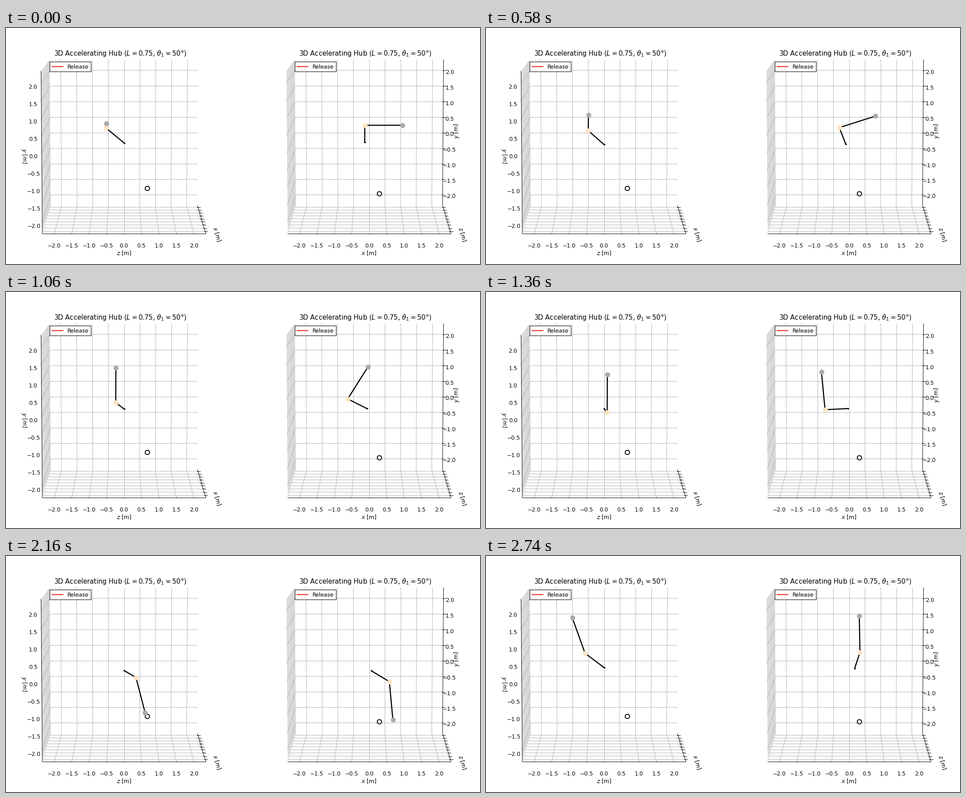
Animation, 1058 px wide and 529 px high, one loop 2760 ms. Source, as a matplotlib script:

```python
import numpy as np
import matplotlib.pyplot as plt
from matplotlib.animation import FuncAnimation
from matplotlib.collections import LineCollection
from matplotlib.patches import Rectangle

W, H = 1058, 529
STEP = 20          # ms per frame
FRAMES = 138
SHIFT = 547.2      # distance between the two panels
LIM = 2.344        # half size of the box in metres
TICKS = np.arange(-2, 2.01, 0.5)
TILT = np.radians(40)
ARM = 1.155        # outer arm length

plt.rcParams["font.family"] = "DejaVu Sans"
fig = plt.figure(figsize=(12, 6), dpi=W / 12, facecolor="white")
ax = fig.add_axes([0, 0, 1, 1])
ax.set_xlim(0, W)
ax.set_ylim(H, 0)
ax.axis("off")


def project(h, y, d, dx=0.0):
    """Perspective view: h to the right, y up, d away from the viewer."""
    w = 1.05025 - 0.0032 * y + 0.02464 * d
    return (263.6 + dx + 77.86 * h / w,
            (269.3 - 3.712 * d - 78.08 * y) / w)


# ---------- static scene ----------

def lines(paths, dx, color):
    pts = [[project(*p, dx) for p in path] for path in paths]
    ax.add_collection(LineCollection(pts, colors=color, linewidths=0.8,
                                     zorder=1 if color != "black" else 2))


def label(x, y, s, size=10, **kw):
    kw = {"ha": "center", "va": "center_baseline", **kw}
    ax.text(x, y, s, fontsize=size, color="black", zorder=3, **kw)


def num(v):
    return f"{v:.1f}".replace("-", "\u2212")


def panel(dx, h_name, d_name, y_right):
    m = LIM
    grid = []
    for t in TICKS:
        grid.append([(t, -m, -m), (t, -m, m), (t, m, m)])
        grid.append([(-m, t, -m), (-m, t, m), (m, t, m)])
        grid.append([(m, -m, t), (-m, -m, t), (-m, m, t)])
    lines(grid, dx, "#b0b0b0")

    a, b = 0.0375, 0.075
    axes = [[(-m, -m, -m), (m, -m, -m)], [(m, -m, -m), (m, -m, m)]]
    for t in TICKS:
        axes.append([(t, -m, -m - a), (t, -m, -m + b)])
        axes.append([(m - a, -m, t), (m + b, -m, t)])
        if y_right:
            axes.append([(m - a, t, m), (m + b, t, m)])
        else:
            axes.append([(-m, t, -m - a), (-m, t, -m + b)])
    if y_right:
        axes.append([(m, -m, m), (m, m, m)])
    else:
        axes.append([(-m, -m, -m), (-m, m, -m)])
    lines(axes, dx, "black")

    for i, t in enumerate(TICKS):
        label(263.3 + dx + 78.1 * t, 486.5, num(t))
        if y_right:
            label(989 + 0.25 * i, 376.3 - 34.75 * i, num(t))
        else:
            label(62.5 - 0.28 * i, 443.3 - 39.05 * i, num(t))

    label(263.2 + dx, 504.5, f"${h_name}$ [m]", va="center")
    label(471.3 + dx, 462.5, f"${d_name}$ [m]", va="center", rotation=-74)
    if y_right:
        label(1006, 231, "$y$ [m]", va="center", rotation=90)
    else:
        label(41, 286.5, "$y$ [m]", va="center", rotation=-90)

    label(255.3 + dx, 62, r"3D Accelerating Hub ($L = 0.75$, $\theta_1 = 50$°)",
          12, va="baseline")

    ax.add_patch(Rectangle((98 + dx, 76), 92, 22, facecolor="white",
                           edgecolor="black", linewidth=0.9, snap=False,
                           zorder=2.5))
    ax.plot([102.6 + dx, 127 + dx], [86.5, 86.5], color="red", lw=1.5,
            snap=False, zorder=3)
    label(137 + dx, 91, "Release", ha="left", va="baseline")


panel(0, "z", "x", False)
panel(SHIFT, "x", "z", True)


# ---------- motion ----------

KEYS = np.array([0, 0.58, 1.06, 1.36, 1.74, 2.16, 2.74])


def track(values, slopes=None):
    """Cubic Hermite curve through the values at KEYS."""
    v = np.array(values, float)
    s = np.gradient(v, KEYS, edge_order=2) if slopes is None else slopes

    def at(t):
        i = int(np.clip(np.searchsorted(KEYS, t, "right") - 1, 0, len(KEYS) - 2))
        h = KEYS[i + 1] - KEYS[i]
        u = (t - KEYS[i]) / h
        return ((1 + 2 * u) * (1 - u) ** 2 * v[i] + u * (1 - u) ** 2 * h * s[i]
                + u * u * (3 - 2 * u) * v[i + 1] + u * u * (u - 1) * h * s[i + 1])
    return at


inner_angle = track([0, 16.6, 58.3, 97, 156.2, 229.6, 347.1],
                    [0, 57, 110, 141, 165, 186, 208])
inner_len = track([0.711, 0.679, 0.685, 0.694, 0.715, 0.702, 0.730])
inner_off = track([0, 0.036, 0.044, 0.041, 0.033, 0.019, -0.051])
outer_angle = track([0, 17.8, 57.9, 95.2, 157.4, 275.3, 451],
                    [0, 58, 105, 141, 210, 330, 250])
outer_z = track([-0.006, -0.002, 0.001, 0.006, 0.025, 0.285, -0.383],
                [0, 0, 0, 0.03, 0.3, 0.3, -1.75])


def pose(t):
    """Hub, elbow and tip as (x, y, z) in metres."""
    hub = np.array([-0.136 + 0.034 * t + 0.0275 * t * t,
                    -0.119 * t + 0.052 * t * t, 0])
    th, r, n = np.radians(inner_angle(t)), inner_len(t), inner_off(t)
    q = r * np.cos(th)
    c, s = np.cos(TILT), np.sin(TILT)
    elbow = hub + [-r * np.sin(th), q * s + n * c, -q * c + n * s]
    ph, z = np.radians(outer_angle(t)), outer_z(t)
    flat = np.sqrt(ARM ** 2 - z * z)
    tip = elbow + [flat * np.cos(ph), flat * np.sin(ph), z]
    return hub, elbow, tip


def view(p, right):
    x, y, z = p
    return project(x, y, -z, SHIFT) if right else project(z, y, x)


def dot(color, size, z):
    return ax.plot([], [], "o", color=color, ms=size, snap=False, zorder=z)[0]


rigs = []
for right in (False, True):
    rod, = ax.plot([], [], color="black", lw=2, snap=False, zorder=5)
    rigs.append((right, rod, (dot("black", 2, 6), dot("bisque", 8, 7),
                              dot("darkgray", 8, 8))))
    ax.plot(*view((0.3, -1.452, 0.7), right), "o", mfc="none", mec="black",
            ms=8, mew=1.5, snap=False, zorder=4)


def update(n):
    points = pose(n * STEP / 1000)
    artists = []
    for right, rod, dots in rigs:
        xy = [view(p, right) for p in points]
        rod.set_data(*zip(*xy))
        for mark, (x, y) in zip(dots, xy):
            mark.set_data([x], [y])
        artists += [rod, *dots]
    return artists


anim = FuncAnimation(fig, update, frames=FRAMES, interval=STEP,
                     init_func=lambda: update(0), repeat=True, repeat_delay=0,
                     blit=False)
plt.show()
```
